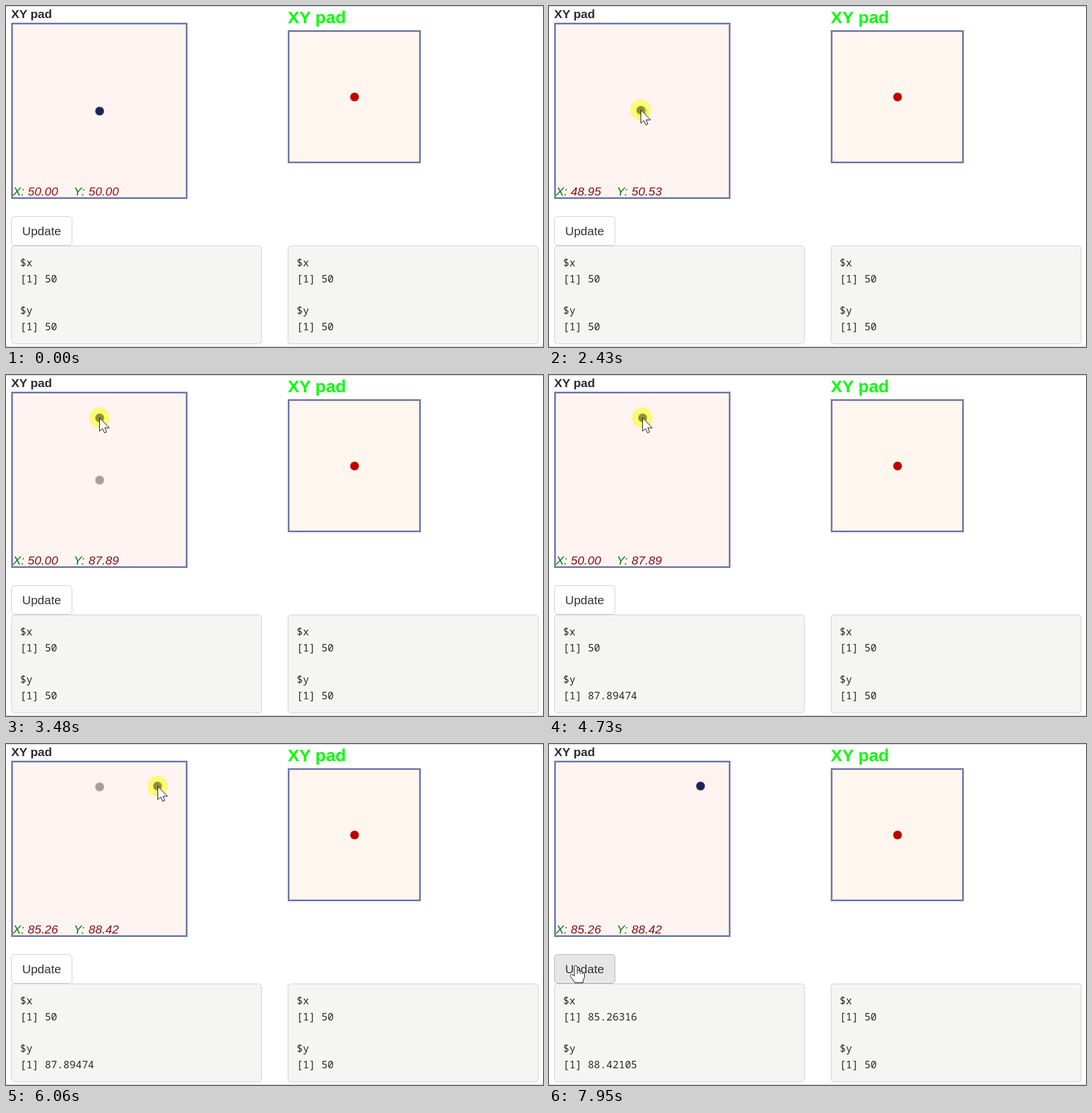
Write an HTML page that moves like this. It is 932 px wide and 592 px high and loops after 8000 ms.

```html
<!DOCTYPE html>
<html lang="en">
<head>
<meta charset="utf-8">
<title>XY pad</title>
<style>
  html, body { margin: 0; width: 100%; height: 100%; overflow: hidden; background: #fff; }
  svg { display: block; width: 932px; height: 592px; }
  text { font-family: "Liberation Sans", Arial, sans-serif; font-size: 21px; fill: #333; white-space: pre; }
  .title { font-weight: bold; fill: #2b2b38; }
  .axis { font-style: italic; fill: #007d00; }
  .value { font-style: italic; fill: #a01616; }
  .code text { font-family: "Noto Sans Mono", "DejaVu Sans Mono", monospace; font-size: 17.85px; fill: #2a2a2a; }
  .pad { stroke: #747bab; stroke-width: 3; }
  .panel { fill: #f5f5f3; stroke: #ccc; }
  .dot { paint-order: stroke; stroke-width: 1.6; }
  .pointer { fill: #fff; stroke: #000; }
</style>
</head>
<body>
<svg viewBox="0 0 932 592">
  <rect width="932" height="592" fill="#fff"/>
  <path d="M0 .5H932M0 591.5H932" stroke="#c9c9c9"/>

  <text class="title" x="9" y="21">XY pad</text>
  <rect class="pad" x="10.5" y="30.5" width="303" height="303" fill="#fff4f2"/>
  <text class="axis" x="12" y="329">X:</text>
  <text class="value" id="xVal" x="37.8" y="329"></text>
  <text class="axis" x="117.6" y="329">Y:</text>
  <text class="value" id="yVal" x="143.3" y="329"></text>

  <text class="title" x="489" y="30" style="font-size:30px;fill:#0f0">XY pad</text>
  <rect class="pad" x="490.5" y="43.5" width="228" height="228" fill="#fff6f0"/>
  <circle class="dot" cx="605" cy="158" r="7.3" fill="#bd0000" stroke="#e3a582"/>

  <rect id="button" x="9.5" y="365.5" width="105" height="50" rx="5.5"/>
  <text x="28" y="398">Update</text>

  <g class="code">
    <rect class="panel" x="9.5" y="416.5" width="434" height="170" rx="5"/>
    <text x="24.6" y="452">$x</text>
    <text x="24.6" y="480" id="xOut"></text>
    <text x="24.6" y="535">$y</text>
    <text x="24.6" y="563" id="yOut"></text>
    <rect class="panel" x="489.5" y="416.5" width="434" height="170" rx="5"/>
    <text x="504.6" y="452">$x</text>
    <text x="504.6" y="480">[1] 50</text>
    <text x="504.6" y="535">$y</text>
    <text x="504.6" y="563">[1] 50</text>
  </g>

  <circle class="dot" id="ghost" r="7.3" fill="#a79d9f" stroke="#dcc5bf"/>
  <circle class="dot" id="dot" r="7.3" fill="#1a2659" stroke="#a3a5b8"/>
  <circle id="glow" r="18" fill="#ff0" opacity=".5"/>
  <g class="pointer">
    <path id="arrow" d="M.5 .5V23.5L5.5 19L9 26.5L12.5 25L9.5 17.8H17.3Z"/>
    <g id="hand">
      <path d="M-3 3.5Q-3 .5-.5 .5Q2 .5 2 3.5V9Q6.5 8 7 11Q10.5 10 11 12.5Q14.5 12 14.5 15.5V20Q14 24 12 27V30.5H-2L-9.5 19.5Q-10.5 16.5-7 16L-3 19Z"/>
      <path d="M2 9V15M7 11V15M11 12.5V16" fill="none"/>
    </g>
  </g>
</svg>
<script>
const LOOP = 8000;
const STEP = 70;       // the pointer is redrawn in steps of this many ms
const LAG = 20;        // the dot trails the pointer a little
const UNIT = 1.5;      // stage pixels per pad step
const UNITS = 190;     // pad steps from 0 to 100
const SHOWN = 730, PRESS = 2080, DROP = 3940;
const PRESS2 = 4730, DRAG2 = 5000, RELEASE2 = 6190, DROP2 = 6260;

const el = {};
document.querySelectorAll("[id]").forEach(e => el[e.id] = e);

const easeOut = p => 1 - (1 - p) ** 2.3;
const smooth = p => p * p * (3 - 2 * p);

// Each leg starts where the last one ended; bend > 1 lets x run ahead of y
const entry = [672, 492];
const legs = [
  { start: SHOWN, end: 1480, to: [164, 188], ease: easeOut, bend: 0.9 },
  { start: 1480, end: 1820, to: [159, 182], ease: easeOut, bend: 1 },
  { start: 2340, end: 3480, to: [162, 74], ease: smooth, bend: 1 },
  { start: 4930, end: 5980, to: [263, 73], ease: smooth, bend: 1 },
  { start: 6790, end: 7880, to: [47, 384], ease: smooth, bend: 1.4 }
];

function pointerAt(t, lag = 0) {
  let [x, y] = entry;
  for (const { start, end, to, ease, bend } of legs) {
    if (t < start) break;
    const held = t < end ? end - Math.ceil((end - t) / STEP) * STEP - lag : end;
    const p = ease(Math.max(0, (held - start) / (end - start)));
    x += (to[0] - x) * (1 - (1 - p) ** bend);
    y += (to[1] - y) * p;
  }
  return [x, y];
}

const percent = k => 50 + k * 100 / UNITS;
const output = k => "[1] " + +percent(k).toFixed(5);
const show = (e, on) => e.setAttribute("visibility", on ? "visible" : "hidden");
const move = (e, x, y) => e.setAttribute("transform", `translate(${x} ${y})`);
const place = (e, [kx, ky]) => move(e, 162.5 + kx * UNIT, 182.5 - ky * UNIT);
const within = (t, a, b) => t >= a && t < b;

// Pad steps from the middle
function padAt(t) {
  if (t < PRESS) return [0, 0];
  const [x, y] = pointerAt(Math.min(t, DROP2), LAG);
  return [Math.round((x - 162.3) / UNIT), Math.round((182 - y) / UNIT)];
}

function draw(t) {
  const [px, py] = pointerAt(t).map(Math.round);
  const now = padAt(t);
  const sent = padAt(t < DROP ? 0 : t < DROP2 ? DROP : DROP2);
  const hover = px < 115 && py >= 365;

  place(el.dot, now);
  place(el.ghost, padAt(t < DRAG2 ? 0 : DROP));
  show(el.ghost, within(t, PRESS, DROP) || within(t, DRAG2, RELEASE2));
  show(el.glow, within(t, PRESS, DROP) || within(t, PRESS2, RELEASE2));

  [el.xVal, el.yVal].forEach((e, i) => {
    e.textContent = percent(now[i]).toFixed(2);
    e.style.fill = t < PRESS ? "#a01616" : "#851414";
  });
  [el.xOut, el.yOut].forEach((e, i) => e.textContent = output(sent[i]));

  el.button.setAttribute("fill", hover ? "#e6e6e6" : "#fff");
  el.button.setAttribute("stroke", hover ? "#adadad" : "#ccc");
  show(el.arrow, t >= SHOWN && !hover);
  show(el.hand, hover);
  [el.glow, el.arrow, el.hand].forEach(e => move(e, px, py));
}

const start = performance.now();
function tick() {
  draw((performance.now() - start) % LOOP);
  requestAnimationFrame(tick);
}
tick();
</script>
</body>
</html>
```
